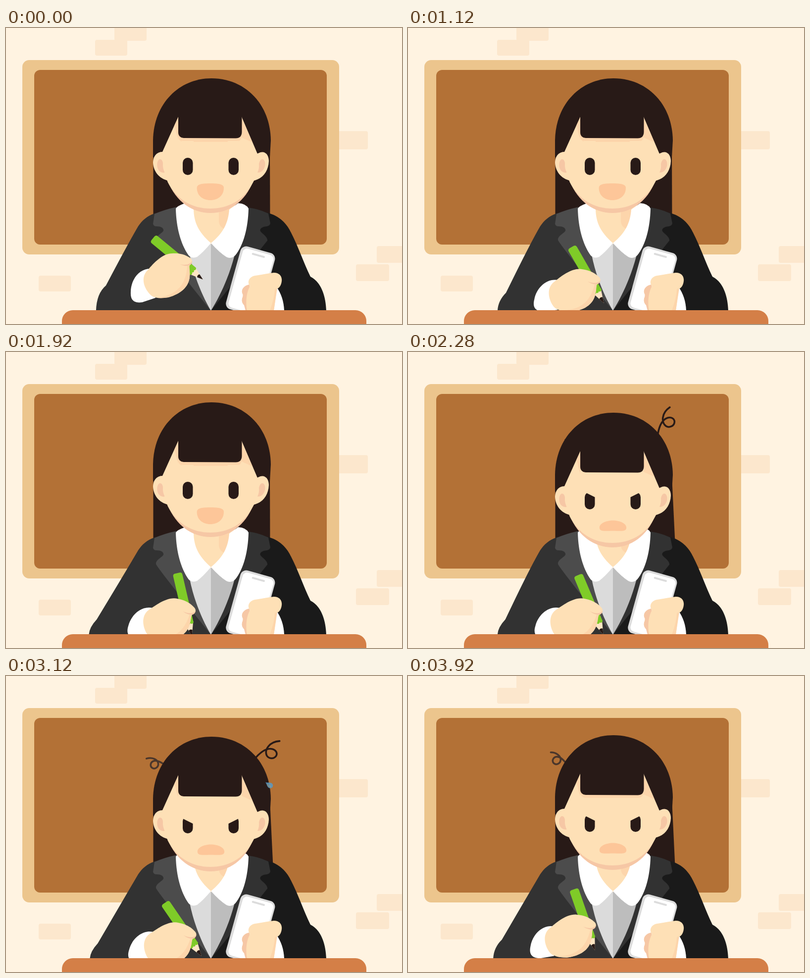
Recreate the animation shown at these times as an HTML page. Size 800 px wide and 600 px high, loop 3960 ms.

```html
<!DOCTYPE html>
<html lang="en">
<head>
<meta charset="utf-8">
<title>Busy student</title>
<style>
html, body { margin: 0; width: 100%; height: 100%; overflow: hidden; background: #fff3e1; }
svg { display: block; width: 800px; height: 600px; }
.hair { fill: #281a17; }
.skin { fill: #fee0b6; }
.shade { fill: #f6c7a5; }
.soft { fill: #fdd5ab; }
.white { fill: #fff; }
.coat { fill: #323232; }
.curl { fill: none; stroke-width: 3.6; stroke-linecap: round; }
</style>
</head>
<body>
<svg viewBox="0 0 800 600">
  <rect width="800" height="600" fill="#fff3e1"/>
  <g fill="#fce7cd">
    <rect x="180" y="24" width="65" height="32" rx="4"/>
    <rect x="219" y="-10" width="65" height="36" rx="4"/>
    <rect x="667" y="209" width="64" height="37" rx="4"/>
    <rect x="66" y="502" width="65" height="32" rx="4"/>
    <rect x="707" y="479" width="67" height="34" rx="4"/>
    <rect x="749" y="442" width="65" height="34" rx="4"/>
  </g>
  <rect x="33" y="65" width="640" height="394" rx="14" fill="#ecc58d"/>
  <rect x="57" y="85" width="591" height="354" rx="12" fill="#b37136"/>

  <path id="back" class="hair"/>
  <g id="curls">
    <g transform="translate(505 144)"><path id="curlR" class="curl" stroke="#281a17" d="M0,0C7,-13 17,-24 28,-24C36,-24 41,-18 39,-12C36,-4 25,-3 20,-9C13,-19 19,-37 39,-43"/></g>
    <g transform="translate(318 157)"><path id="curlL" class="curl" stroke="#4a362b" d="M0,0C-6,-6 -12,-11 -18,-10C-25,-9 -28,-2 -24,3C-19,8 -10,4 -10,-4C-10,-12 -20,-19 -31,-18"/></g>
  </g>

  <!-- jacket, shirt and collar -->
  <path id="arm" class="coat"/>
  <path fill="#1a1a1a" d="M488,363L533,376C556,383 569,400 576,415C590,442 601,475 615,504C635,514 646,540 647,573H414Z"/>
  <path fill="#4c4c4c" d="M344,363Q320,368 300,377L297,397Q298,402 304,402C314,402 319,406 318,411C316,416 302,421 303,430Q306,438 414,573L380,440Z"/>
  <path class="coat" d="M489,364Q512,367 530,376L534,396Q533,401 527,402C516,403 512,408 514,412C517,417 529,423 528,431L414,573L455,440Z"/>
  <path fill="#dbdbdb" d="M414,430L371,460C379,500 395,541 414,573Z"/>
  <path fill="#bdbdbd" d="M414,430L462,460C451,502 434,541 414,573Z"/>
  <path class="skin" d="M366,350H464L456,410L414,438L372,410Z"/>
  <path class="soft" d="M430,360H452V385Q446,397 440,407Q431,402 430,393Z"/>
  <path class="white" d="M343,366Q345,361 362,355L379,368C380,394 388,413 414,436Q398,455 386,464Q376,468 369,461C353,438 344,405 343,366Z"/>
  <path class="white" d="M451,368L469,355Q485,356 490,366C489,405 480,440 463,461Q455,469 445,464Q431,455 414,436C439,416 449,395 451,368Z"/>

  <g id="head">
    <path class="hair" d="M297,262V228C298,153 350,102 415,102C482,102 534,153 535,228L533,262Z"/>
    <path class="skin" d="M318,251C303,250 297,262 297,273C298,293 312,308 332,310L334,255Z"/>
    <path class="skin" d="M514,252C525,249 531,259 531,270C530,291 518,307 497,310L495,260Z"/>
    <path class="shade" d="M311,266C305,267 303,281 309,289Q313,294 321,293Q316,285 317,274Q316,266 311,266Z"/>
    <path class="shade" d="M518,266C524,267 526,279 520,287Q516,293 508,293Q512,285 511,275Q513,266 518,266Z"/>
    <path class="shade" d="M326,309C344,354 378,375 413,375C450,375 483,353 500,309Z"/>
    <path class="skin" d="M316,251L348,180H476L508,255C511,285 505,304 498,315C480,350 448,366 413,366C376,366 345,348 327,313C318,292 316,270 316,251Z"/>
    <path class="soft" d="M348,182L340,198L348,226ZM476,184L498,232L476,222Z"/>
    <rect id="fringe" class="soft" x="348" width="128" height="43" rx="11"/>
    <path class="hair" d="M348,180L350,170H474L476.500,182V211Q476,223.500 464,223.500L359,223Q348,222 348,211Z"/>
    <rect class="hair" x="357" y="263" width="20.500" height="35" rx="10.250"/>
    <rect class="hair" x="449.500" y="263" width="20.500" height="35" rx="10.250"/>
    <path id="brows" class="skin" d="M355,267L379,279V255H355ZM472,267L448,279V255H472Z"/>
    <path id="mouth" fill="#fdc699"/>
  </g>
  <g id="drops"></g>

  <!-- phone and the hand holding it -->
  <g transform="translate(511.500 449.500) rotate(15.500)">
    <rect x="-36" width="72" height="132" rx="12" fill="#dcdcdc"/>
    <rect x="-31" y="4" width="64" height="124" rx="9" class="white"/>
    <rect x="-12" y="9.500" width="27" height="4" rx="2" fill="#dcdcdc"/>
  </g>
  <path class="white" d="M546,524Q561,545 562,573H540Z"/>
  <path class="shade" d="M492,520C482,521 475,529 477,537Q480,542 477,548Q475,556 481,562L484,573H500Z"/>
  <path class="skin" d="M493,523C486,516 491,504 503,502C518,500 530,497 541,496C553,496 558,504 557,513C556,522 552,527 547,529L541,573H487C484,558 485,537 493,523Z"/>
  <path class="soft" d="M548,527L541,573H533Q542,549 543,530Z"/>

  <!-- writing hand -->
  <g id="hand">
    <path class="white" d="M296,488C270,485 252,510 252,535C251,553 260,558 275,556L302,547Z"/>
    <g id="pencil">
      <path fill="#fde5c4" d="M-9.500,24L9.500,24L0,53Z"/>
      <path class="hair" d="M-3.900,41Q0,38 3.900,41L0,53Z"/>
      <path fill="#7fcb28" d="M-9.500,-73Q-9.500,-78 -4.500,-78H4.500Q9.500,-78 9.500,-73V27Q6,31 3,27Q0,31 -3,27Q-6,31 -9.500,27Z"/>
    </g>
    <path class="skin" d="M287,490C298,477 316,457 335,457C348,456 360,458 372,466C378,470 377,478 371,481C369,487 372,495 371,505C369,523 356,538 328,546C310,549 298,547 292,541C278,527 271,505 287,490Z"/>
    <path class="soft" d="M370,482Q372,494 371,505C369,523 356,538 328,546Q314,548 306,547C344,541 364,522 366,482Z"/>
    <path class="shade" d="M376,472C372,480 362,481 351,479Q363,484 371,481Q376,478 376,472Z"/>
  </g>
  <rect x="113" y="572" width="615" height="60" rx="22" fill="#d47f47"/>
</svg>
<script>
const LOOP = 3960;
const $ = id => document.getElementById(id);
const set = (id, name, value) => $(id).setAttribute(name, value);
const mix = (a, b, u) => a + (b - a) * u;
const wave = (t, peak, period) => Math.cos(2 * Math.PI * (t - peak) / period);

// Eased step from 0 to 1 between two times.
function ramp(t, from, to) {
  const u = Math.min(1, Math.max(0, (t - from) / (to - from)));
  return u * u * (3 - 2 * u);
}

// Sweat drops: start time, start point and speed; all fall alike.
const drops = [
  { from: 3070, x: 527, y: 219, vx: 37, vy: 1 },
  { from: 3155, x: 305, y: 225, vx: -86, vy: -59 },
  { from: 3420, x: 527, y: 205, vx: 63, vy: -47 }
];
const LIFE = 380, FALL = 90;
$('drops').innerHTML = drops.map((d, i) => `<g id="drop${i}">
  <path fill="#579bc9" d="M0,-17C3,-9 10,-3 10,4C10,10 5,14 0,14C-5,14 -10,10 -10,4C-10,-3 -3,-9 0,-17Z"/>
  <path fill="#83a4a8" d="M-1,-12Q3,-2 -2,9Q-8,8 -8,3Q-7,-4 -1,-12Z"/></g>`).join('');

function drawDrop(d, i, t) {
  const u = (t - d.from) / LIFE, id = 'drop' + i;
  if (u < 0 || u > 1) return set(id, 'opacity', 0);
  const x = d.x + d.vx * u, y = d.y + d.vy * u + FALL * u * u;
  const turn = Math.atan2(-d.vx, d.vy + 2 * FALL * u) * 180 / Math.PI;
  set(id, 'transform', `translate(${x} ${y}) rotate(${turn}) scale(${Math.min(1, .35 + u * 1.5)})`);
  set(id, 'opacity', Math.min(1, .7 + u, (1 - u) * 7));
}

function drawHand(t) {
  const low = ramp(t, 800, 1280) - ramp(t, 3780, 4120);
  const x = 376 + low * (10.5 + 6.5 * wave(t, 1180, 1150));
  const y = 474 + 53 * low, turn = 14.5 * low;
  const tilt = mix(50.4, 23.7 + 10.7 * wave(t, 3115, 480), ramp(t, 700, 1120));
  set('hand', 'transform', `translate(${x - 376} ${y - 474}) rotate(${turn} 376 474)`);
  set('pencil', 'transform', `translate(357 476) rotate(${-tilt - turn})`);

  // The sleeve follows the hand: outer edge and elbow.
  const edge = 168 + (x - 383) * 1.3 + 23 * (1 - low);
  const ex = edge + 20 - 4 * low, ey = 522 + 20 * low;
  set('arm', 'd', `M345,363L300,376C285,381 275,390 267,402Q246,438 ${ex},${ey}Q${edge + 1},${ey + 16} ${edge},573H414V400Z`);
}

function drawMouth(mood) {
  const c = mix(412.8, 414, mood), l = c - 27.2, r = c + 27.2;
  const top = mix(315, 320.5, mood), bottom = mix(349, 341.5, mood);
  const side = mix(324, 335, mood), up = mix(316, 327, mood), down = mix(340, 344, mood);
  set('mouth', 'd', `M${l},${side}C${l},${up} ${c - 15},${top} ${c},${top}S${r},${up} ${r},${side}` +
    `C${r},${down} ${c + 15},${bottom} ${c},${bottom}S${l},${down} ${l},${side}Z`);
}

function drawCurls(t) {
  const out = ramp(t, 2120, 2240);
  const right = 28 - 54 * Math.exp((2160 - t) / 750);
  const left = Math.max(-130, 6 - 81 * Math.exp((2640 - t) / 331));
  set('curlR', 'transform', `rotate(${right}) scale(${out - ramp(t, 3760, 3880)})`);
  set('curlL', 'transform', `rotate(${left}) scale(${out})`);
}

function draw(t) {
  const mood = ramp(t, 1960, 2160);
  const nod = 21 * (mood - ramp(t, 3840, 4180));
  const move = `translate(0 ${nod})`;
  set('head', 'transform', move);
  set('curls', 'transform', move);
  set('back', 'd', `M297.500,${230 + nod}H533L${533.5 + 6 * mood},385H297.500Z`);
  set('fringe', 'y', 180 + 8 * Math.min(1, (21 - nod) / 4));
  set('brows', 'transform', `translate(0 ${nod - 26 + 5 * ramp(t, 2640, 3100)})`);
  drawHand(t);
  drawMouth(mood);
  drawCurls(t);
  drops.forEach((d, i) => drawDrop(d, i, t));
}

const start = performance.now();
function tick() {
  draw((performance.now() - start) % LOOP);
  requestAnimationFrame(tick);
}
tick();
</script>
</body>
</html>
```
